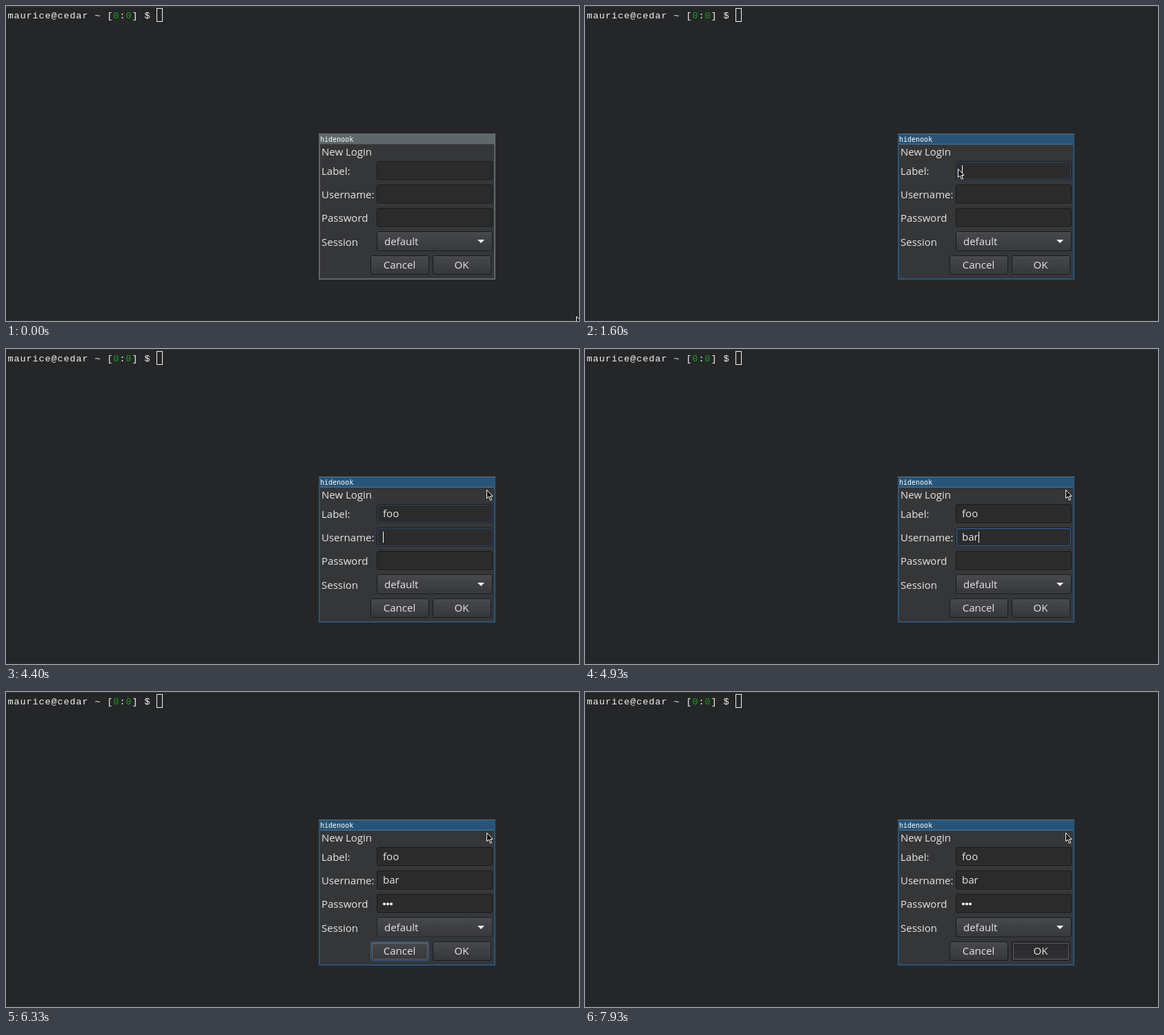
An HTML page with a canvas for the animation above (8000 ms loop, 830 px wide and 457 px high).

```html
<!DOCTYPE html>
<html lang="en">
<head>
<meta charset="utf-8">
<title>Login dialog</title>
<style>
html, body { margin: 0; width: 100%; height: 100%; overflow: hidden; background: #252628; }
canvas { display: block; }
</style>
</head>
<body>
<canvas id="stage" width="830" height="457"></canvas>
<script>
const ctx = document.getElementById('stage').getContext('2d');
const LOOP = 8000, FADE = 200;
const UI = '400 15px "Open Sans", "Noto Sans", sans-serif';
const TITLE = '10px "DejaVu Sans Mono", monospace';
const TERM = '13.5px "Liberation Mono", monospace';
const INK = '#e6e6e6', BLUE = '#3468b4';
const ACTIVE = 1470, PRESS = 7930;

// Pointer stops: time, x, y
const path = [
  [1070, 826, 450], [1200, 800, 425], [1330, 757, 382],
  [1470, 668, 298], [1600, 540, 236], [1730, 512, 231]
];
const JUMP = [3130, 696, 204];

// Typing times per field, with the span during which each holds focus
const fields = [
  { y: 225, word: 'foo', keys: [3930, 4130, 4270], from: 1530, to: 4330 },
  { y: 259, word: 'bar', keys: [4670, 4870, 4930], from: 4330, to: 5130 },
  { y: 293, dots: true, keys: [5470, 5600, 5730], from: 5130, to: 6070 }
];
const combo = { from: 6070, to: 6200 };
const cancel = { from: 6200, to: 6470 };
const ok = { from: 6470, to: PRESS };

const clamp = v => Math.max(0, Math.min(1, v));
const held = (o, t) => t >= o.from && t < o.to;

function glow(o, t) {
  const top = clamp((Math.min(t, o.to) - o.from + 30) / FADE);
  return t < o.to ? top : top * (1 - clamp((t - o.to + 30) / FADE));
}

function rect(x, y, w, h, fill) {
  ctx.fillStyle = fill;
  ctx.fillRect(x, y, w, h);
}

function round(x, y, w, h, r, fill, stroke) {
  ctx.beginPath();
  ctx.roundRect(x, y, w, h, r);
  if (fill) { ctx.fillStyle = fill; ctx.fill(); }
  if (stroke) { ctx.strokeStyle = stroke; ctx.lineWidth = 1; ctx.stroke(); }
}

function text(s, x, y, font = UI, color = INK, align = 'left') {
  ctx.font = font;
  ctx.fillStyle = color;
  ctx.textAlign = align;
  ctx.fillText(s, x, y);
}

function ring(x, y, w, h, a) {
  if (a <= 0) return;
  ctx.globalAlpha = a;
  round(x + 1.5, y + 1.5, w - 3, h - 3, 1.5, null, BLUE);
  ctx.globalAlpha = 1;
}

function terminal(t) {
  rect(0, 0, 830, 457, '#252628');
  rect(0, 0, 830, t < ACTIVE ? 2 : 1, t < ACTIVE ? '#303234' : '#333537');
  rect(0, 456, 830, 1, '#2b2d2f');
  [...'maurice@cedar ~ [0:0] $'].forEach((c, i) =>
    text(c, 2.5 + i * 9, 18, TERM, c === '0' ? '#18a018' : '#f4f4f4'));
  ctx.strokeStyle = '#f4f4f4';
  ctx.lineWidth = 1;
  ctx.strokeRect(218.5, 3.5, 8, 19);
}

function frame(t) {
  const on = t >= ACTIVE;
  rect(453, 185, 256, 212, on ? '#285577' : '#5f676a');
  rect(455, 201, 252, 194, '#353638');
  rect(453, 185, 256, 1, on ? '#4c7899' : '#6b7376');
  rect(455, 200, 252, 1, on ? '#4c7899' : '#45494b');
  text('hidenook', 455, 197, TITLE, '#fff');
  text('New Login', 457, 217);
  text('Label:', 457, 245);
  text('Username:', 457, 279);
  text('Password', 457, 313);
  text('Session', 457, 348);
}

function caretOn(f, t) {
  if (!held(f, t)) return false;
  // Each key press restarts the blink
  const last = f.keys.reduce((a, k) => k <= t ? k : a, f.from);
  return (t - last) % 1200 < 800;
}

function field(f, t) {
  const { y } = f;
  round(537.5, y + 1.5, 167, 27, 2.5, null, '#444547');
  round(537.5, y + 0.5, 167, 27, 2.5, '#2b2b2c', '#18191a');
  ring(537, y, 168, 28, glow(f, t));
  const n = f.keys.filter(k => k <= t).length;
  let end = 546;
  if (f.dots) {
    ctx.fillStyle = '#f0f0f0';
    for (let i = 0; i < n; i++) {
      ctx.beginPath();
      ctx.arc(548 + i * 5, y + 14.5, 2.1, 0, Math.PI * 2);
      ctx.fill();
    }
    end += n * 5;
  } else {
    const s = f.word.slice(0, n);
    text(s, 546, y + 19);
    end += Math.round(ctx.measureText(s).width);
  }
  if (caretOn(f, t)) rect(end, y + 6, 1, 16, '#fff');
}

function button(x, y, w, h, o, t, down) {
  const g = ctx.createLinearGradient(0, y, 0, y + h);
  g.addColorStop(0, down ? '#29292b' : '#48494c');
  g.addColorStop(1, down ? '#303133' : '#363739');
  round(x + 0.5, y + 1.5, w - 1, h - 1, 2.5, null, '#3d3e40');
  round(x + 0.5, y + 0.5, w - 1, h - 1, 2.5, g, '#18191a');
  if (!down) {
    rect(x + 2, y + 1, w - 4, 1, '#505154');
    ring(x - 1, y - 1, w + 2, h + 2, glow(o, t));
  }
  if (held(o, t) || down) {
    ctx.setLineDash([1, 1]);
    ctx.strokeStyle = '#8c8d90';
    ctx.lineWidth = 1;
    ctx.strokeRect(x + 2.5, y + 2.5, w - 5, h - 5);
    ctx.setLineDash([]);
  }
}

function controls(t) {
  fields.forEach(f => field(f, t));
  button(537, 327, 168, 29, combo, t);
  text('default', 548, 347);
  ctx.fillStyle = '#fff';
  ctx.beginPath();
  ctx.moveTo(683, 339);
  ctx.lineTo(693, 339);
  ctx.lineTo(688, 344);
  ctx.fill();
  button(528, 362, 85, 28, cancel, t);
  text('Cancel', 570, 381, UI, INK, 'center');
  button(618, 362, 85, 28, ok, t, t >= PRESS);
  text('OK', 660, 381, UI, INK, 'center');
}

function pointerAt(t) {
  if (t >= JUMP[0]) return JUMP.slice(1);
  if (t <= path[0][0]) return path[0].slice(1);
  const i = path.findIndex(p => p[0] >= t);
  if (i < 0) return path[path.length - 1].slice(1);
  const [a, b] = [path[i - 1], path[i]];
  const u = (t - a[0]) / (b[0] - a[0]);
  return [1, 2].map(k => Math.round(a[k] + (b[k] - a[k]) * u));
}

function pointer(t) {
  const [x, y] = pointerAt(t);
  ctx.save();
  ctx.translate(x + 0.5, y + 0.5);
  ctx.lineJoin = 'round';
  ctx.beginPath();
  [[0, 0], [0, 12], [3, 9.5], [5, 15], [7, 14], [5, 9], [8.5, 9]]
    .forEach(p => ctx.lineTo(...p));
  ctx.closePath();
  ctx.fillStyle = '#000';
  ctx.fill();
  ctx.strokeStyle = '#fff';
  ctx.lineWidth = 1;
  ctx.stroke();
  ctx.restore();
}

function draw(now) {
  const k = Math.floor((now % LOOP + 4) * 15 / 1000);
  const t = Math.round(k * 20 / 3) * 10 % LOOP;
  terminal(t);
  frame(t);
  controls(t);
  pointer(t);
}

const start = performance.now();
function tick() {
  draw(performance.now() - start);
  requestAnimationFrame(tick);
}
tick();
</script>
</body>
</html>
```
